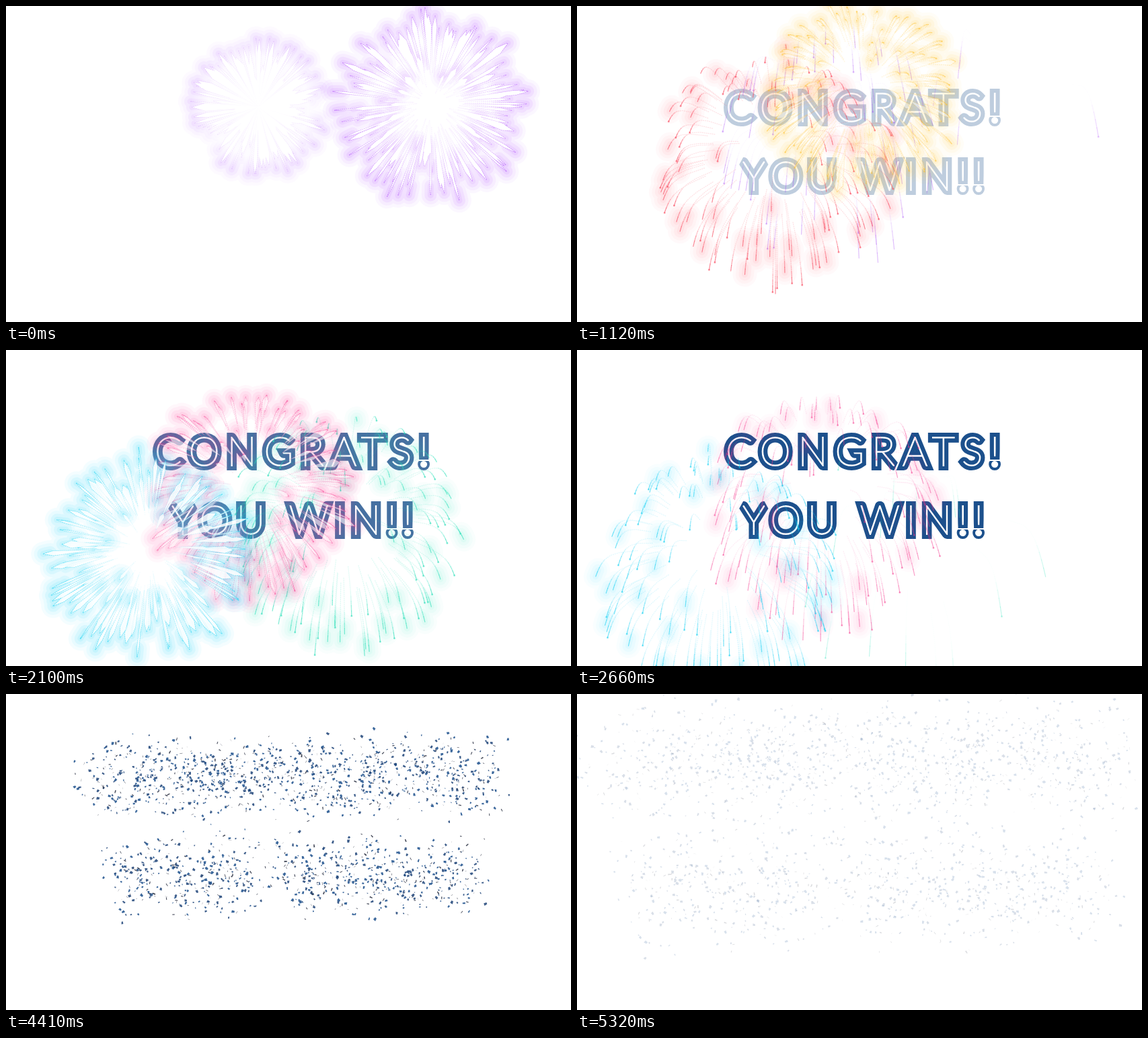
Animation of 840 by 470 pixels, one loop 5390 ms. Source, as an HTML page with a canvas:

```html
<!DOCTYPE html>
<html lang="en">
<head>
<meta charset="utf-8">
<title>Congrats! You win!!</title>
<style>
  html, body { margin: 0; width: 100%; height: 100%; overflow: hidden; background: #fff; }
  canvas { display: block; }
</style>
</head>
<body>
<canvas id="stage" width="840" height="470" role="img" aria-label="CONGRATS! YOU WIN!!"></canvas>
<script>
const W = 840, H = 470, LOOP = 5390, STEP = 70;
const BURSTS_END = 3290, SHATTER = 3920, SHARDS = 2100, RAYS = 130;
const BLUE = '#1c508c';
const ctx = document.getElementById('stage').getContext('2d');

function rng(seed) {
  return () => {
    seed = (seed + 0x6D2B79F5) | 0;
    let n = Math.imul(seed ^ (seed >>> 15), 1 | seed);
    n = (n + Math.imul(n ^ (n >>> 7), 61 | n)) ^ n;
    return ((n ^ (n >>> 14)) >>> 0) / 4294967296;
  };
}
const clamp = v => Math.max(0, Math.min(1, v));

// Inline lettering: a thin face under a heavy outline.
const STROKE = 14;
function letter(c, text, left, right, base) {
  c.font = '100 59px Lato, Inter, sans-serif';
  c.letterSpacing = '0px';
  const m = c.measureText(text);
  const ink = m.actualBoundingBoxLeft + m.actualBoundingBoxRight;
  c.letterSpacing = (right - left - STROKE - ink) / (text.length - 1) + 'px';
  const x = left + STROKE / 2 + m.actualBoundingBoxLeft;
  c.miterLimit = 2;
  c.strokeStyle = BLUE;
  c.lineWidth = STROKE;
  c.strokeText(text, x, base);
  c.strokeStyle = c.fillStyle = '#fff';
  c.lineWidth = 1.8;
  c.strokeText(text, x, base);
  c.fillText(text, x, base);
}

const sign = document.createElement('canvas');
sign.width = W;
sign.height = H;
const sc = sign.getContext('2d');
letter(sc, 'CONGRATS!', 218, 630, 172);
letter(sc, 'YOU WIN!!', 240, 606, 274);
sc.clearRect(611, 163, 20, 2);
sc.clearRect(564, 265, 44, 2);

// Shards start on inked points of the lettering.
function makeShards() {
  const px = sc.getImageData(0, 0, W, H).data, rand = rng(11), list = [];
  for (let tries = 0; list.length < SHARDS && tries < 60000; tries++) {
    const x = 216 + rand() * 416, y = 121 + rand() * 162;
    const i = ((y | 0) * W + (x | 0)) * 4;
    if (px[i + 3] < 128 || px[i] > 128) continue;
    const dir = rand() * Math.PI * 2, push = 75 * Math.sqrt(rand());
    list.push({
      x, y,
      dx: (x - 422) * 1.06 + Math.cos(dir) * push,
      dy: (y - 212) * 1.06 + Math.sin(dir) * push,
      size: 0.8 + rand() * 1.4,
      turn: rand() * 6.28, spin: (rand() - 0.5) * 0.012,
      tilt: rand() * 6.28, tumble: 0.002 + rand() * 0.006
    });
  }
  return list;
}
const shards = makeShards();

function drawShards(age) {
  const e = 1 - Math.exp(-age / 861);
  const tones = [BLUE, '#1f4478', '#2a3042'].map(tone => [tone, new Path2D()]);
  shards.forEach((s, i) => {
    const squash = Math.cos(s.tilt + s.tumble * age);
    const path = tones[Math.abs(squash) < 0.5 ? 2 : i % 2][1];
    const x = s.x + s.dx * e, y = s.y + s.dy * e;
    const a = s.turn + s.spin * age, c = Math.cos(a), n = Math.sin(a);
    const w = s.size, h = s.size * squash;
    path.moveTo(x + w * c - h * n, y + w * n + h * c);
    path.lineTo(x + w * c + h * n, y + w * n - h * c);
    path.lineTo(x - w * c + h * n, y - w * n - h * c);
    path.lineTo(x - w * c - h * n * 0.4, y - w * n + h * c * 0.4);
    path.closePath();
  });
  ctx.globalAlpha = 1 - Math.pow(age / 1560, 1.7);
  for (const [tone, path] of tones) {
    ctx.fillStyle = tone;
    ctx.fill(path);
  }
}

// x, y, start, reach, colour
const bursts = [
  [632, 147, -350, 185, '168,64,250'],
  [375, 150, -200, 165, '160,64,245'],
  [297, 212, 250, 185, '248,62,84'],
  [425, 122, 580, 165, '255,190,40'],
  [500, 247, 1255, 185, '40,222,184'],
  [362, 205, 1600, 182, '244,54,140'],
  [212, 298, 1690, 188, '0,204,240']
].map(([x, y, start, reach, rgb], k) => {
  const rand = rng(31 + k * 7);
  const rays = Array.from({ length: RAYS }, (_, i) => {
    const dir = (i + rand() * 3) / RAYS * Math.PI * 2, z = rand() * 2 - 1;
    const speed = reach * Math.sqrt(1 - z * z * 0.85) * (0.84 + rand() * 0.18);
    return {
      vx: Math.cos(dir) * speed, vy: Math.sin(dir) * speed,
      width: 0.6 + rand() * rand() * 6,
      life: 1050 + rand() * 450, halo: rand()
    };
  });
  return { x, y, start, reach, rgb, rays };
});

// Fast burst followed by a slow drift outwards.
const spread = age => 0.85 * (1 - Math.exp(-age / 160)) + 0.15 * age / 1000;

function place(b, ray, age) {
  const e = spread(age);
  return [b.x + ray.vx * e, b.y + ray.vy * e + 4.4e-5 * age * age];
}

function trace(path, b, ray, from, to, parts) {
  path.moveTo(...place(b, ray, from));
  for (let i = 1; i <= parts; i++) path.lineTo(...place(b, ray, from + (to - from) * i / parts));
}

function stroke(path, style, width, alpha) {
  ctx.strokeStyle = style;
  ctx.lineWidth = width;
  ctx.globalAlpha = clamp(alpha);
  ctx.stroke(path);
}

function drawHalo(b, rays, age) {
  const path = new Path2D(), thin = (age - 500) / 700;
  for (const ray of rays) {
    if (ray.halo > thin) trace(path, b, ray, Math.max(0, age - 60 - age * 0.06), age, 2);
  }
  const glow = clamp(age / 350) * clamp(1.1 - age / 1500);
  for (const [width, alpha] of [[36, 0.05], [27, 0.06], [18, 0.09], [9, 0.1]]) {
    stroke(path, `rgb(${b.rgb})`, width, alpha * glow);
  }
}

function drawCore(b, radius, age) {
  const strength = clamp(1 - (age - 150) / 300);
  if (!strength) return;
  const g = ctx.createRadialGradient(b.x, b.y, 0, b.x, b.y, radius * 0.95);
  g.addColorStop(0, '#fff');
  g.addColorStop(0.75, '#fff');
  g.addColorStop(1, 'rgba(255,255,255,0)');
  ctx.globalAlpha = strength;
  ctx.fillStyle = g;
  ctx.fillRect(b.x - radius, b.y - radius, radius * 2, radius * 2);
}

function drawPetals(b, rays, radius, age, tail, white) {
  const path = new Path2D();
  for (const ray of rays) {
    const [x0, y0] = place(b, ray, tail), [x1, y1] = place(b, ray, age);
    const len = Math.hypot(x1 - x0, y1 - y0) || 1;
    const nx = (y0 - y1) / len * ray.width, ny = (x1 - x0) / len * ray.width;
    const mx = x0 + (x1 - x0) * 0.8, my = y0 + (y1 - y0) * 0.8;
    path.moveTo(x0, y0);
    path.lineTo(mx + nx, my + ny);
    path.lineTo(x1, y1);
    path.lineTo(mx - nx, my - ny);
    path.closePath();
  }
  const g = ctx.createRadialGradient(b.x, b.y, radius * 0.3, b.x, b.y, radius);
  g.addColorStop(0, `rgba(${b.rgb},0.1)`);
  g.addColorStop(1, `rgb(${b.rgb})`);
  ctx.setLineDash([1, 2]);
  stroke(path, g, 1.4, white * 0.7 * clamp(age / 380) ** 2);
  ctx.setLineDash([]);
  ctx.globalAlpha = white;
  ctx.fillStyle = '#fff';
  ctx.fill(path);
}

function drawTrails(b, rays, age, tail, strength) {
  const color = `rgb(${b.rgb})`, parts = 5, span = (age - tail) / parts;
  const wash = new Path2D(), heads = new Path2D();
  for (const ray of rays) {
    trace(wash, b, ray, age * 0.22, age, 6);
    if (ray.halo < 0.35) {
      const [x, y] = place(b, ray, age);
      heads.moveTo(x + 1.5, y);
      heads.arc(x, y, 1.5, 0, 7);
    }
  }
  const fade = clamp(1.25 - age / 1600);
  ctx.setLineDash([1, 2]);
  stroke(wash, color, 1.3, 0.28 * strength * fade * clamp(1.6 - age / 1000));
  ctx.setLineDash([]);
  for (let k = 0; k < parts; k++) {
    const path = new Path2D();
    for (const ray of rays) trace(path, b, ray, tail + span * k, tail + span * (k + 1), 2);
    const near = (k + 1) / parts;
    stroke(path, color, 2.2 - near, near * near * 0.75 * strength * fade);
  }
  ctx.globalAlpha = 0.7 * strength * fade;
  ctx.fillStyle = color;
  ctx.fill(heads);
}

function drawBurst(b, age) {
  const rays = b.rays.filter(r => age < r.life);
  if (age <= 0 || !rays.length) return;
  const radius = b.reach * spread(age);
  const tail = Math.max(0, age - 200 - age * 0.25);
  const white = clamp(1 - (age - 350) / 350);
  drawHalo(b, rays, age);
  drawCore(b, radius, age);
  if (white < 1) drawTrails(b, rays, age, tail, 1 - white);
  if (white > 0) drawPetals(b, rays, radius, age, tail, white);
}

function draw(t) {
  ctx.globalAlpha = 1;
  ctx.fillStyle = '#fff';
  ctx.fillRect(0, 0, W, H);
  if (t > SHATTER) return drawShards(t - SHATTER);
  ctx.globalAlpha = clamp((t - 600) / 1850);
  ctx.drawImage(sign, 0, 0);
  if (t < BURSTS_END) for (const b of bursts) drawBurst(b, t - b.start);
}

ctx.lineCap = ctx.lineJoin = 'round';
const begin = performance.now();
let shown = -1;
function tick() {
  const t = Math.floor((performance.now() - begin) % LOOP / STEP) * STEP;
  if (t !== shown) draw(shown = t);
  requestAnimationFrame(tick);
}
tick();
</script>
</body>
</html>
```
